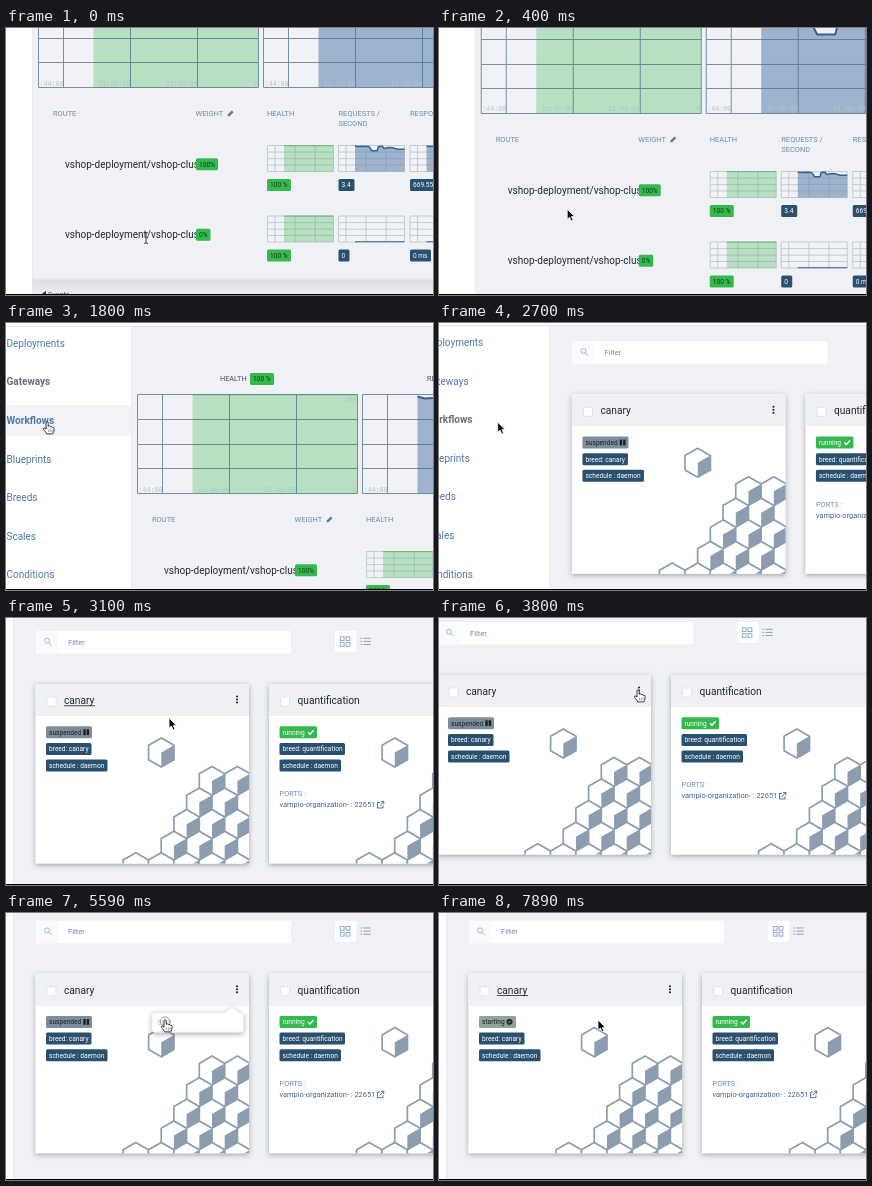
These frames come from a looping animation (427x267 px, 7.99 s). An HTML page:

```html
<!DOCTYPE html>
<html lang="en">
<head>
<meta charset="utf-8">
<title>Workflow start</title>
<style>
html, body { margin: 0; width: 100%; height: 100%; overflow: hidden; background: #eff1f4; }
svg { display: block; width: 427px; height: 267px; font-family: Roboto, "Open Sans", sans-serif; }
.mono { font-family: "Liberation Mono", "DejaVu Sans Mono", monospace; }
.thin { vector-effect: non-scaling-stroke; }
</style>
</head>
<body>
<svg id="stage" viewBox="0 0 427 267" xmlns="http://www.w3.org/2000/svg"></svg>
<script>
const LOOP = 7990;
const BG = '#eff1f4', NAVY = '#29506f', GREEN = '#35b94f', LINK = '#4b78aa', LABEL = '#6d8bb0', CUBE = '#8b9dae';

// ---- drawing helpers ----
const rect = (x, y, w, h, fill, extra = '') =>
  `<rect x="${x}" y="${y}" width="${w}" height="${h}" fill="${fill}" ${extra}/>`;
const path = (d, stroke, width, fill = 'none', extra = '') =>
  `<path d="${d}" stroke="${stroke}" stroke-width="${width}" fill="${fill}" ${extra}/>`;
const text = (x, y, s, size, fill, extra = '') =>
  `<text x="${x}" y="${y}" font-size="${size}" fill="${fill}" ${extra}>${s}</text>`;
const group = (id, body, extra = '') => `<g id="${id}" ${extra}>${body}</g>`;
const badge = (x, y, w, s, fill, color = '#fff') =>
  rect(x, y, w, 12, fill, 'rx="1.5"') + text(x + 3, y + 8.4, s, 6.6, color);

// ---- gateway page ----
const LOAD = [[55, 2], [62, 4], [80, 3], [100, 4], [104, 7], [111, 20], [129, 20], [133, 4], [146, 3],
  [152, 11], [168, 8], [182, 9], [196, 14], [220, 14]];

function chart(x, y, kind, sx = 1, sy = 1) {
  const big = sx === 1;
  const line = LOAD.map(p => p.join(' ')).join('L');
  let s = rect(0, 0, 220, 99, '#f1f2f5');
  if (kind === 'health') {
    s += rect(55, 0, 165, 99, '#b7e0c1') + path('M55 .5H220', '#7fc98f', 1.2, 'none', 'class="thin"');
  } else if (kind === 'load') {
    s += path(`M55 99L${line}V99Z`, 'none', 0, '#9db3cd');
  }
  const cols = [0, 25, 92, 159, 220].map(v => `M${v} 0V99`).join('');
  const rows = [0, 25, 50, 74, 99].map(v => `M0 ${v}H220`).join('');
  s += path(cols + rows, big ? '#47718f' : '#71869a', big ? 1 : .7, 'none', `class="thin" opacity="${big ? .75 : .5}"`);
  if (kind === 'load') s += path('M' + line, '#34638f', big ? 2 : 1.5, 'none', 'class="thin" stroke-linejoin="round"');
  if (kind === 'idle') s += path('M55 98H220', '#34638f', 1.2, 'none', 'class="thin"');
  if (big) {
    const tag = (tx, ty, v) => text(tx, ty, v, 6.7, '#b3c2c8', 'class="mono" text-anchor="end"');
    s += tag(25, 97, ':44:00') + tag(92, 97, '21:46:00') + tag(159, 97, '21:48:00') + tag(219, 97, '0') + tag(219, 7, '100');
  }
  return `<g transform="translate(${x} ${y}) scale(${sx} ${sy})">${s}</g>`;
}

function route(y, weight, width, kind, rate, delay) {
  const mini = (x, k) => chart(x, y + .5, k, .3, .263);
  return text(158, y + 22.6, 'vshop-deployment/vshop-clus', 10, '#24282f', 'clip-path="url(#cell)"') +
    badge(289, y + 13.3, width, weight, GREEN, '#12351c') +
    mini(360.5, 'health') + mini(431.5, kind) + mini(503, kind) +
    badge(360, y + 34, 24, '100 %', GREEN, '#12351c') +
    badge(431.5, y + 34, rate.length > 1 ? 16 : 11, rate, NAVY) +
    badge(503, y + 34, delay.length > 5 ? 36 : 21, delay, NAVY);
}

const head = (x, y, s) => text(x, y, s, 7.5, LABEL);
const gateway =
  text(214, 58, 'HEALTH', 7.3, '#4b5058') + badge(244, 50, 24, '100 %', GREEN, '#12351c') +
  text(421, 58, 'REQUESTS / SECOND', 7.3, '#4b5058') + badge(497, 50, 16, '3.4', NAVY) +
  chart(131.5, 71.5, 'health') + chart(356.5, 71.5, 'load') +
  head(146, 199, 'ROUTE') + head(288.5, 199, 'WEIGHT') +
  path('M320.5 199.5l.5-2.2 3.8-3.8 1.7 1.7-3.8 3.8z', 'none', 0, '#587ba3') +
  head(360, 199, 'HEALTH') + head(431.5, 199, 'REQUESTS /') + head(431.5, 209, 'SECOND') +
  head(503, 199, 'RESPONSE TIME') +
  route(228, '100%', 22, 'load', '3.4', '669.55 ms') +
  route(298.5, '0%', 14.5, 'idle', '0', '0 ms') +
  rect(125, 364, 420, 40, 'url(#panel)', 'filter="url(#shadow)"') +
  path('M139 374v5l-4-2.5z', 'none', 0, '#30353c') + text(141, 379.5, 'Events', 7.3, '#4b5058');

// ---- sidebar ----
const ITEMS = ['Deployments', 'Gateways', 'Workflows', 'Blueprints', 'Breeds', 'Scales', 'Conditions'];
const menuItem = (name, i) =>
  text(.5, 23.8 + i * 38.6, name, 10, LINK, `id="nav${i}"`);
const sidebar = rect(-130, -200, 255, 700, '#fff') + rect(125, -200, .6, 700, '#e4e7eb') +
  rect(-130, 82, 255, 31, '#f1f3f6', 'id="hover"') + ITEMS.map(menuItem).join('');
const header = rect(-130, -60, 800, 63, '#fff') + rect(-130, 3, 800, .8, '#dcdfe4');

// ---- workflow cards ----
function cube(x, y, filled = true) {
  const r = 14.6, w = 12.7, h = r / 2;
  return path(`M${x} ${y - r}l${w} ${h}v${r}l${-w} ${h}l${-w} ${-h}v${-r}z`, CUBE, 1.7, '#fff') +
    (filled ? path(`M${x} ${y}l${w} ${-h}v${r}l${-w} ${h}z`, 'none', 0, CUBE) : '');
}

function cubes() {
  const step = 12.7;
  let s = cube(155.3, 134.5);
  for (let row = 0; row < 5; row++) {
    const first = 206 - step * (row === 4 ? 6 : row);
    for (let x = first; x < 257; x += 2 * step) s += cube(x, 163 + row * 21.6, x > 160);
  }
  return s;
}

function card(dx, title, body) {
  return `<g transform="translate(${dx})">` +
    rect(29.5, 66, 213.5, 179.5, '#fff', 'filter="url(#shadow)"') +
    `<g clip-path="url(#card)">${cubes()}</g>` +
    rect(29.5, 66, 213.5, 32, '#eef0f3') +
    rect(41, 79, 9, 9, '#fff', 'rx="1" stroke="#d9dde3" stroke-width=".8"') +
    text(58, 86, title, 10.2, '#1f2730') +
    [78.5, 81.5, 84.5].map(y => `<circle cx="231" cy="${y}" r="1.05" fill="#20252b"/>`).join('') +
    body + badge(40, 141.6, 61.5, 'schedule : daemon', NAVY) + '</g>';
}

const teeth = [0, 45, 90, 135].map(a => rect(-.8, -3.1, 1.6, 6.2, '#20262b', `transform="rotate(${a})"`)).join('');
const gear = group('gear', teeth + '<circle r="2.3" fill="#20262b"/><circle r=".9" fill="#8fa39b"/>');

const canary = group('suspended', badge(40, 108.2, 46, 'suspended', '#7d8d9a', '#1a1f24') +
    rect(77.3, 111.3, 2.4, 5.8, '#1a1f24') + rect(80.7, 111.3, 2.4, 5.8, '#1a1f24')) +
  group('starting', badge(40, 108.2, 37, 'starting', '#8fa39b', '#1a1f24') +
    `<g transform="translate(70.5 114.2)">${gear}</g>`) +
  badge(40, 124.9, 45.5, 'breed: canary', NAVY) +
  rect(58, 87.4, 31, .8, '#1f2730', 'id="underline"');

const quant = badge(40, 108.2, 37.5, 'running', GREEN) +
  path('M68.5 114.2l2 2 3.6-4', '#fff', 1.4) +
  badge(40, 124.9, 65.5, 'breed: quantification', NAVY) +
  text(40, 178.3, 'PORTS :', 7.4, LABEL) +
  text(40, 189.4, 'vampio-organization- : 22651', 7.43, '#3c6590') +
  path('M140.5 184.5h-2.5v5.5h5.5v-2.5M141.500 183.500h2.800v2.800M144 183.800l-3.700 3.700', '#3c6590', .9);

const popup = group('popup',
  path('M148 105H219.5l6.5-6.8 6.5 6.8H235q2.5 0 2.5 2.5V122q0 2.5-2.5 2.5H148.5q-2.5 0-2.5-2.5v-14.5q0-2.5 2.5-2.5z',
    '#e0e3e7', .6, '#fff', 'filter="url(#shadow)"') +
  text(151.5, 117.3, 'Start', 6.7, '#30363d', 'id="start"'));

const listIcon = [20.3, 23.4, 26.5].map(y => `M354.5 ${y}h1.6M357.5 ${y}h7.2`).join('');
const cards =
  rect(30, 13, 255, 22.5, '#fff', 'rx="2"') + rect(30, 13, 22, 22.5, '#fafbfc', 'rx="2"') +
  '<circle cx="41" cy="22.7" r="2.5" fill="none" stroke="#9db0c8" stroke-width=".9"/>' + path('M42.8 24.5l2.700 2.700', '#9db0c8', 1) +
  text(62, 26.7, 'Filter', 7.5, LABEL) +
  rect(329, 13, 21.5, 21, '#fff', 'rx="2"') +
  [[334.3, 18.8], [340.1, 18.8], [334.3, 24.6], [340.1, 24.6]].map(([x, y]) =>
    rect(x, y, 3.8, 3.8, 'none', 'stroke="#86a2c5" stroke-width=".9"')).join('') +
  path(listIcon, '#86a2c5', 1) +
  card(0, 'canary', canary) + card(233.5, 'quantification', quant) + popup;

// ---- pointers, each with its tip at 0,0 ----
const pointers =
  group('ibeam', path('M-2-5.5q2 0 2 1.2 0-1.2 2-1.2M0-4.3V4.3M-2 5.5q2 0 2-1.2 0 1.2 2 1.2', '#25282c', .9)) +
  group('arrow', path('M0 0V10.2l2.4-2.2 1.7 3.9 1.8-.8-1.7-3.7H7.3z', '#fff', .8, '#000')) +
  group('hand', path('M-1 1q0-1.2 1.1-1.2T1.2 1V4.2q2-.7 2.3.5 1.7-.6 2 .7 1.7-.3 1.7 1.2 0 3-1.5 5.3H-.3q-.8-2-3.2-4.4-.7-1.2.5-1.6 1 0 2 1.3z', '#222', .9, '#fff') +
    path('M1.6 7.5v2.6M3.4 7.5v2.6M5.1 7.5v2.6', '#444', .5));

const stage = document.getElementById('stage');
stage.innerHTML = `<defs>
  <clipPath id="cell"><rect x="150" y="200" width="140" height="160"/></clipPath>
  <clipPath id="card"><rect x="29.5" y="66" width="213.5" height="179.5"/></clipPath>
  <linearGradient id="panel" x1="0" y1="0" x2="0" y2="1">
    <stop offset="0" stop-color="#dcdee1"/><stop offset=".25" stop-color="#ebecef"/></linearGradient>
  <filter id="shadow" x="-10%" y="-40%" width="120%" height="190%">
    <feDropShadow dx="0" dy="1.6" stdDeviation="2.8" flood-color="#2c3540" flood-opacity=".42"/></filter></defs>` +
  rect(0, 0, 427, 267, BG) +
  group('world', group('gateway', gateway) +
    group('cards', cards, 'transform="translate(118 6)"') + sidebar + header) +
  '<circle id="ring" r="4.6" fill="#fff" fill-opacity=".4" stroke="#8d9298" stroke-width=".9"/>' +
  group('pointer', pointers) + rect(0, 266, 427, 1, '#000');

const el = {};
stage.querySelectorAll('[id]').forEach(e => { el[e.id] = e; });

// ---- motion: [ms, x, y, easing power (above 1 starts slow, below 0 ends slow)] ----
const CAMERA = [[0, 26, -111], [800, 50, -47, 1.3], [1500, 125, 0, -1.4], [2600, 125, 0], [3100, 7, -6, 1.3],
  [3500, -24, -15, -1.5], [3900, -24, -15], [4500, -10, -15], [4800, 6, -12], [4900, 7, -11.6], [5200, 7, -11.3]];
const MOUSE = [[0, 140, 210], [800, 111, 139, 1.3], [1500, 41, 98, -1.4], [1800, 41, 99], [2600, 41, 99],
  [3100, 163, 100, 1.2], [3500, 199, 72, -1.5], [4000, 199, 72], [4500, 174.5, 111], [4800, 159.5, 107], [5200, 159, 107]];

function at(track, t) {
  const i = track.findIndex(k => k[0] > t);
  if (i < 0) return track[track.length - 1].slice(1, 3);
  const a = track[i - 1], b = track[i], p = b[3] || 1;
  const u = (t - a[0]) / (b[0] - a[0]);
  const e = p < 0 ? 1 - (1 - u) ** -p : u ** p;
  return [a[1] + (b[1] - a[1]) * e, a[2] + (b[2] - a[2]) * e];
}

const show = (id, on) => { el[id].style.display = on ? '' : 'none'; };
const fade = (id, v) => { el[id].setAttribute('opacity', Math.max(0, Math.min(1, v))); };
const between = (t, a, b) => t >= a && t < b;

function nav(i, active, hover) {
  el['nav' + i].setAttribute('font-weight', active || hover ? 700 : 400);
  el['nav' + i].setAttribute('fill', active ? '#686e77' : LINK);
}

function draw(ms) {
  const t = Math.floor((ms + 10) / 100) * 100;
  const [cx, cy] = at(CAMERA, t);
  const [mx, my] = at(MOUSE, t);
  el.world.setAttribute('transform', `translate(${cx - 125} ${cy})`);
  el.pointer.setAttribute('transform', `translate(${mx} ${my})`);

  const paged = t >= 2000, overNav = between(t, 1500, 2700);
  show('gateway', !paged);
  show('cards', paged);
  fade('cards', (t - 1900) / 500);
  show('hover', overNav);
  nav(1, !paged, false);
  nav(2, paged, overNav);

  const hand = between(t, 1800, 2700) || between(t, 3800, 5900);
  show('ibeam', t < 300);
  show('hand', hand);
  show('arrow', t >= 300 && !hand);

  show('underline', between(t, 3000, 3800) || t >= 5900);
  show('popup', between(t, 4100, 5900));
  fade('popup', t < 4300 ? (t - 4000) / 300 : t > 5600 ? (5900 - t) / 300 : 1);
  fade('start', t < 5600 ? 1 : .4);
  show('ring', between(t, 5400, 5800));
  el.ring.setAttribute('transform', `translate(${mx} ${my + 1.5})`);

  show('suspended', t < 6700);
  show('starting', t >= 6700);
  el.gear.setAttribute('transform', `rotate(${(t - 6700) * .18})`);
}

const began = performance.now();
function tick() {
  draw((performance.now() - began) % LOOP);
  requestAnimationFrame(tick);
}
tick();
</script>
</body>
</html>
```
